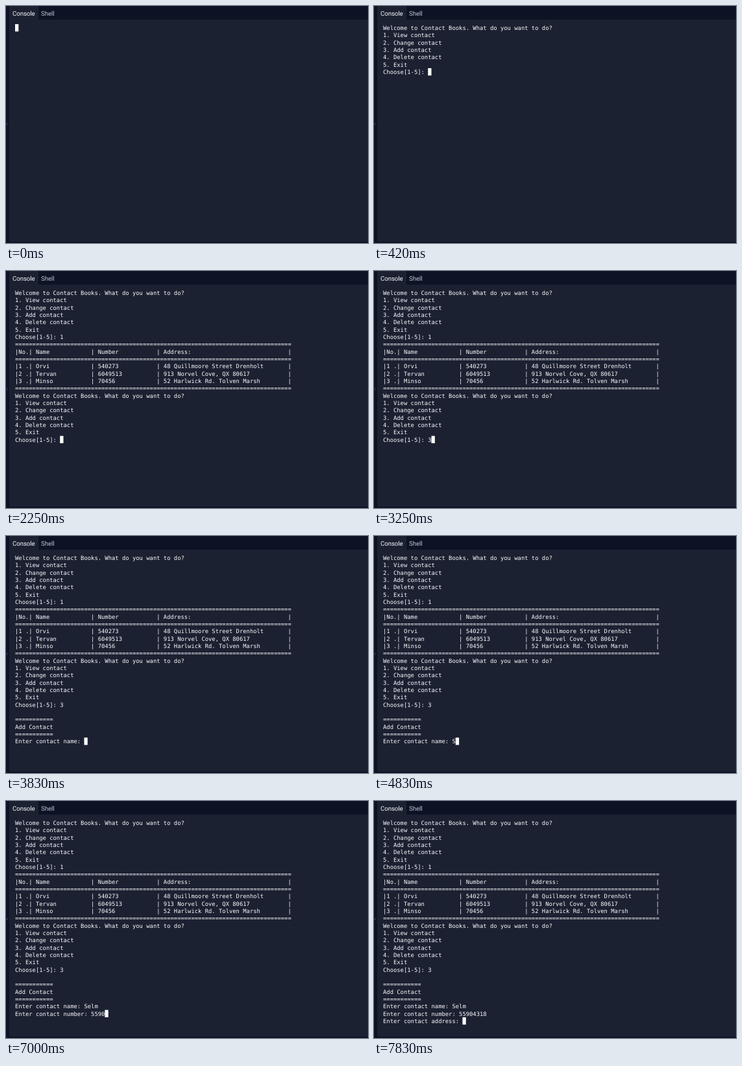
An HTML page with a canvas that plays this animation: 558 px wide and 366 px high, repeating every 8 s.

```html
<!DOCTYPE html>
<html lang="en">
<head>
<meta charset="utf-8">
<title>Contact console</title>
<style>
html, body { margin: 0; width: 100%; height: 100%; overflow: hidden; background: #0d1325; }
canvas { display: block; width: 558px; height: 366px; }
</style>
</head>
<body>
<canvas id="stage"></canvas>
<script>
const W = 558, H = 366, LOOP = 8000;
const LEFT = 14, TOP = 28, COL = 5.322, ROW = 11.333, BASE = 9;
const MONO = '8.84px "DejaVu Sans Mono", "Liberation Mono", monospace';
const SANS = '9.7px Roboto, "Open Sans", sans-serif';

const canvas = document.getElementById('stage');
const ctx = canvas.getContext('2d');
const ratio = window.devicePixelRatio || 1;
canvas.width = W * ratio;
canvas.height = H * ratio;
ctx.scale(ratio, ratio);
ctx.textRendering = 'geometricPrecision';

const rule = '='.repeat(80) + '\n';
const row = (no, name, number, address) =>
  `|${no}| ${name.padEnd(16)}| ${number.padEnd(17)}| ${address.padEnd(36)}|\n`;

const menu = 'Welcome to Contact Books. What do you want to do?\n' +
  ['View contact', 'Change contact', 'Add contact', 'Delete contact', 'Exit']
    .map((item, i) => `${i + 1}. ${item}\n`).join('') + 'Choose[1-5]: ';

const table = rule + row('No.', 'Name', 'Number', 'Address:') + rule +
  row('1 .', 'Orvi', '540273', '48 Quillmoore Street Drenholt') +
  row('2 .', 'Tervan', '6049513', '913 Norvel Cove, QX 80617') +
  row('3 .', 'Minso', '70456', '52 Harlwick Rd. Tolven Marsh') + rule;

const bar = '='.repeat(11) + '\n';

// Each entry adds text to the console at its time.
const type = (text, times) => times.map((t, i) => [t, text[i]]);
const script = [
  [80, menu],
  [1830, '1'],
  [2170, '\n' + table + menu],
  [2920, '3'],
  [3330, '\n\n' + bar + 'Add Contact\n' + bar + 'Enter contact name: '],
  ...type('Selm', [4670, 4910, 5080, 5330]),
  [5670, '\nEnter contact number: '],
  ...type('55904318', [6670, 6750, 6920, 7000, 7080, 7170, 7250, 7420]),
  [7580, '\nEnter contact address: ']
];

function label(text, x, y, color) {
  ctx.fillStyle = color;
  ctx.fillText(text, x, y);
}

function drawFrame() {
  ctx.fillStyle = '#0d1325';
  ctx.fillRect(0, 0, W, H);
  ctx.fillStyle = '#1c2132';
  ctx.fillRect(5, 0, 45, 22);
  ctx.beginPath();
  ctx.roundRect(5, 21, W, 343, [0, 0, 0, 3]);
  ctx.fill();

  ctx.font = SANS;
  ctx.letterSpacing = '-0.1px';
  label('Console', 10, 15, '#f4f6fa');
  label('Shell', 54, 15, '#bcc2cb');
  label('›', 0, 185, '#4a5163');
  ctx.letterSpacing = '0px';
}

function drawConsole(text) {
  const lines = text.split('\n');
  ctx.font = MONO;
  ctx.fillStyle = '#fbfcfe';
  lines.forEach((line, r) => {
    const y = Math.round(TOP + r * ROW + BASE);
    [...line].forEach((ch, c) => {
      if (ch !== ' ') ctx.fillText(ch, LEFT + c * COL, y);
    });
  });

  const last = lines.length - 1;
  ctx.fillRect(LEFT + lines[last].length * COL, TOP + last * ROW, COL, ROW);
}

let shown = -1;
function tick(now) {
  const t = now % LOOP;
  const count = script.filter(([at]) => at <= t).length;
  if (count !== shown) {
    shown = count;
    drawFrame();
    drawConsole(script.slice(0, count).map(step => step[1]).join(''));
  }
  requestAnimationFrame(tick);
}
tick(0);
</script>
</body>
</html>
```
